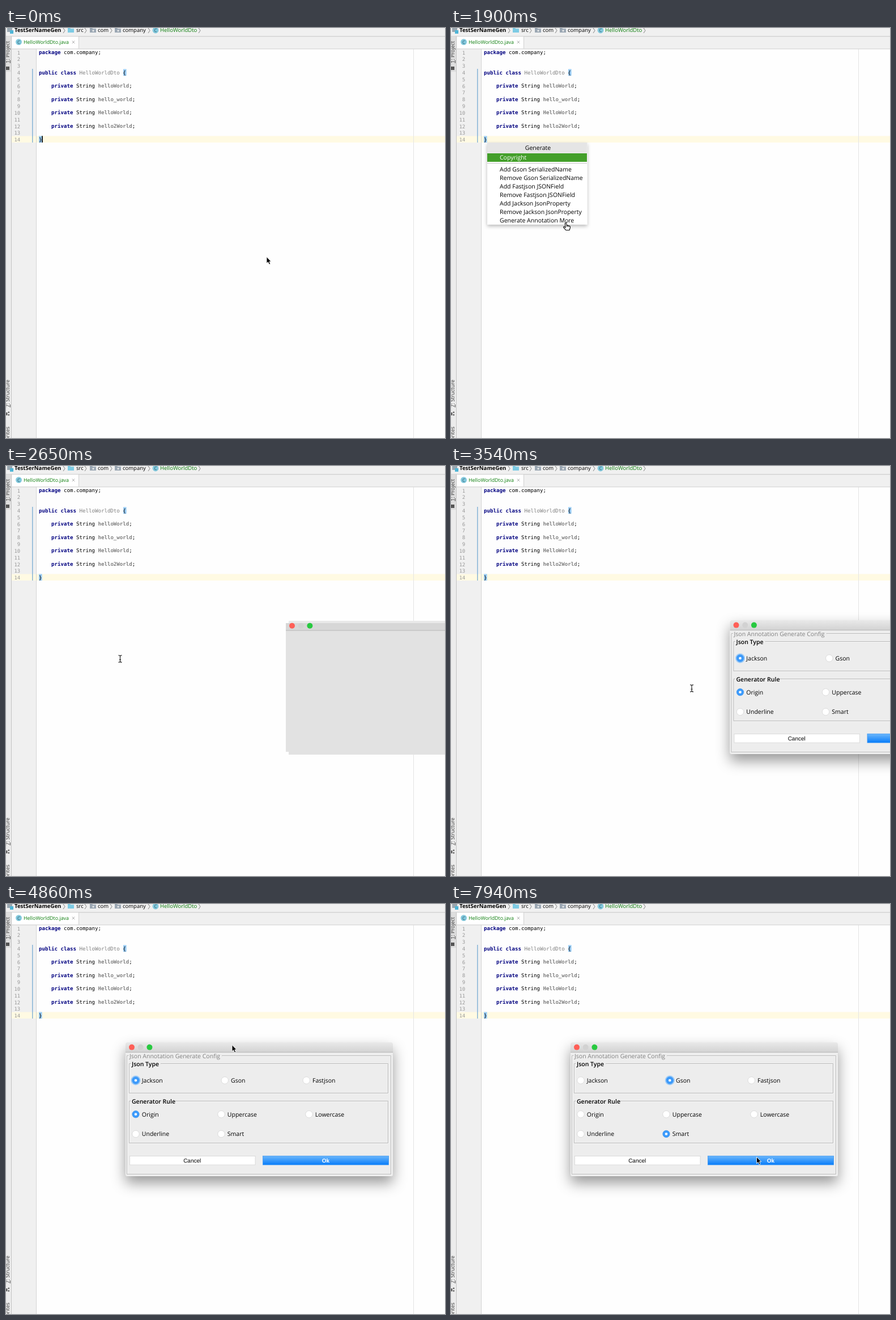
Animation of 775 by 723 pixels, one loop 8000 ms. Source, as an HTML page:

```html
<!DOCTYPE html>
<html lang="en">
<head>
<meta charset="utf-8">
<title>Generate menu demo</title>
<style>
html, body { margin: 0; width: 100%; height: 100%; overflow: hidden; background: #fff; }
svg { display: block; width: 100vw; height: 100vh; }
text { font: 500 10.5px "Open Sans", "Noto Sans", sans-serif; fill: #000; white-space: pre; text-rendering: geometricPrecision; }
.code { font: 9.14px "DejaVu Sans Mono", monospace; fill: #000; }
.kw { font-weight: bold; fill: #000080; }
.dim { fill: #808080; }
.field { font-weight: bold; fill: #808080; }
.num { font: 8.9px "DejaVu Sans Mono", monospace; fill: #999; text-anchor: end; }
.crumb { font-size: 9.5px; }
.project { font-weight: bold; font-size: 9.6px; }
.tab { font-size: 8.9px; }
.side { font-size: 9px; fill: #333; }
.green { fill: #0b7d0b; }
.head { font-weight: 600; }
.mid { text-anchor: middle; }
.btn { font: 10px "Liberation Sans", Arial, sans-serif; text-anchor: middle; }
</style>
</head>
<body>
<svg viewBox="0 0 775 723" preserveAspectRatio="none">
  <defs>
    <filter id="deep" x="-20%" y="-25%" width="140%" height="160%">
      <feDropShadow dx="0" dy="12" stdDeviation="12.5" flood-opacity=".4"/>
    </filter>
    <filter id="soft" x="-10%" y="-10%" width="120%" height="120%">
      <feDropShadow dx="0" dy="3" stdDeviation="3" flood-opacity=".28"/>
    </filter>
    <linearGradient id="bar" x2="0" y2="1"><stop stop-color="#e9e9e9"/><stop offset="1" stop-color="#d3d3d3"/></linearGradient>
    <linearGradient id="blue" x2="0" y2="1"><stop stop-color="#6cb7fb"/><stop offset="1" stop-color="#077cfa"/></linearGradient>
  </defs>
  <g id="editor"></g>
  <g id="menu"></g>
  <g id="ghost"></g>
  <g id="dialog"></g>
  <g id="arrow"><path d="M0 0V11.6L2.7 9.2 4.6 13.6 6.7 12.7 4.9 8.4H8.2Z" stroke="#fff" stroke-width=".9"/></g>
  <g id="hand"><path d="M-1.2 .8Q0-.8 1.2 .8L2 5 3.6 4.6 5.4 5.2 7 5.8Q8.4 6.4 8 8.4L6.6 13H.4L-3.6 8.4Q-4.4 6.6-2.6 6.9L-.4 8.4Z" fill="#fff" stroke="#000" stroke-width="1.1"/><path d="M2 5V7.4M3.9 5V7.4M5.7 5.6V7.6" stroke="#000" stroke-width=".7"/></g>
  <g id="beam"><path d="M-3-6.2Q0-6.2 0-4.5Q0-6.2 3-6.2M0-4.5V4.5M-3 6.2Q0 6.2 0 4.5Q0 6.2 3 6.2M-1.5 1.5H1.5" fill="none" stroke="#222" stroke-width="1.2"/></g>
</svg>
<script>
const $ = id => document.getElementById(id);
const rect = (x, y, w, h, fill, more = '') => `<rect x="${x}" y="${y}" width="${w}" height="${h}" fill="${fill}" ${more}/>`;
const circle = (x, y, r, fill, more = '') => `<circle cx="${x}" cy="${y}" r="${r}" fill="${fill}" ${more}/>`;
const text = (x, y, s, cls = '', more = '') => `<text x="${x}" y="${y}" class="${cls}" ${more}>${s}</text>`;
const span = (cls, s) => `<tspan class="${cls}">${s}</tspan>`;
const path = (d, color, more = '') => `<path d="${d}" fill="none" stroke="${color}" ${more}/>`;
const side = (y, s, anchor = 'start') => text(0, 0, s, 'side', `transform="translate(5.8 ${y}) rotate(-90)" text-anchor="${anchor}"`);

function classIcon(x, y) {
  return circle(x, y, 5.4, '#82c8dc') + text(x, y + 2.9, 'C', 'mid', 'style="font-size:8px;fill:#28566a"');
}

function folder(x, color, dot) {
  return `<path d="M${x} 0H${x + 4}L${x + 5.5} 1.2H${x + 11}V8H${x}Z" fill="${color}"/>` +
    (dot ? circle(x + 6, 4.8, 1.6, '#eee') : '');
}

function drawEditor() {
  const row = i => 43 + i * 11.81;
  const field = name => '    ' + span('kw', 'private') + ' String ' + span('field', name) + ';';
  const code = {
    0: span('kw', 'package') + ' com.company;',
    3: span('kw', 'public class') + ' ' + span('dim', 'HelloWorldDto') + ' {',
    5: field('helloWorld'), 7: field('hello_world'),
    9: field('HelloWorld'), 11: field('hello2World'), 13: '}'
  };
  let s = rect(0, 0, 775, 723, '#fefefe') + rect(0, 0, 775, 37, '#f0f0f0') +
    rect(10, 37, 43.5, 686, '#f0f0f0') + rect(10, 190.5, 765, 11.5, '#fffae3') +
    path('M53.5 37V723', '#d4d4d4') + path('M719.5 37V723', '#e4e4e4') +
    path('M46.8 72V202', '#76aad3', 'stroke-width="1.3"') +
    rect(207, 72.5, 5.6, 11.8, '#99ccf5') + rect(58, 190.5, 5.6, 11.5, '#99ccf5');
  for (let i = 0; i < 14; i++) {
    s += text(25.2, row(i) + 3.6, i + 1, 'num');
    if (code[i]) s += text(58, row(i) + 3.2, code[i], 'code');
  }
  // breadcrumbs
  s += path('M0 14.8H775', '#c6c6c6') + rect(2, 0, 9, 7, '#9aa7b0') + rect(7, 4, 6, 6, '#4fb5d6') +
    text(15, 7.4, 'TestSerNameGen', 'project') +
    folder(109, '#7dcbe4') + text(124, 7.4, 'src', 'crumb') +
    folder(148, '#9ba7b3', true) + text(162, 7.4, 'com', 'crumb') +
    folder(192, '#9ba7b3', true) + text(206, 7.4, 'company', 'crumb') +
    classIcon(264, 4) + text(272, 7.4, 'HelloWorldDto', 'crumb green');
  for (const x of [101, 139, 184, 251, 340]) s += path(`M${x} 0L${x + 3} 4.5 ${x} 9`, '#777', 'stroke-width=".9"');
  // file tab
  s += rect(10, 15.3, 118, 21.2, '#fff') + path('M128.5 15V36.5M10 36.9H775', '#cfcfcf') +
    classIcon(22.5, 24.6) + text(31, 27.8, 'HelloWorldDto.java', 'tab green') +
    path('M116.7 22.6L121.3 27.2M121.3 22.6L116.7 27.2', '#aaa');
  // tool strip
  s += rect(0, 15.3, 9.5, 708, '#ececec') + rect(0, 15.3, 9.5, 62, '#dedede') + path('M9.5 15V723', '#c4c4c4') +
    side(62, '<tspan text-decoration="underline">1</tspan>: Project') + rect(0, 68, 6, 6, '#555') +
    side(669, '<tspan text-decoration="underline">7</tspan>: Structure') +
    rect(0, 678, 2.5, 5, '#666') + rect(3.5, 676.5, 2.5, 2.5, '#666') + rect(3.5, 681, 2.5, 2.5, '#666') +
    side(703, '2: Favorites', 'end');
  $('editor').innerHTML = s + rect(63.2, 190.3, 1.7, 11.6, '#000', 'id="caret"');
}

function drawMenu(last) {
  const items = ['Add Gson SerializedName', 'Remove Gson SerializedName', 'Add Fastjson JSONField',
    'Remove Fastjson JSONField', 'Add Jackson JsonProperty', 'Remove Jackson JsonProperty', 'Generate Annotation More'];
  const white = 'style="fill:#fff"';
  $('menu').innerHTML = rect(64, 202, 176.5, 144.5, '#fff', 'filter="url(#soft)"') +
    rect(64, 202, 176.5, 18.7, '#e5e5e5') + text(153.5, 215, 'Generate', 'mid') +
    rect(64, last ? 331.3 : 221, 176, 15, '#439f2a') +
    text(86, 232.2, 'Copyright', '', last ? '' : white) + path('M64 238.5H240', '#c4c4c4') +
    items.map((s, i) => text(86, 252.8 + i * 15, s, '', last && i === 6 ? white : '')).join('');
}

const lights = (x, y) => ['#ff5f57', '#d2d2d2', '#28c940'].map((c, i) => circle(x + i * 15.7, y, 5, c)).join('');

function drawGhost(full) {
  $('ghost').innerHTML = rect(499, 273, 276, 236, '#e2e2e2') + rect(499, 273, 276, 17, '#e9e9e9') +
    (full ? rect(494, 277, 281, 227, '#e2e2e2') + rect(494, 277, 281, 13, '#d7d7d7') : '') +
    path(`M${full ? 494 : 499} 290H775`, '#b8b8b8') + lights(505, 281.8);
}

// etched frame with a gap for its title
function panel(x, y, w, h, label, end, cls) {
  const d = `M${x + 3} ${y}H${x}V${y + h}H${x + w}V${y}H${end}`;
  return path(d, '#f7f7f7', 'transform="translate(1 1)"') + path(d, '#b9b9b9') + text(x + 4.5, y + 4.6, label, cls);
}

const radios = [['Jackson', 229, 311], ['Gson', 386.3, 311], ['Fastjson', 530.3, 311],
  ['Origin', 229, 370.8], ['Uppercase', 380, 370.8], ['Lowercase', 535, 370.8],
  ['Underline', 229, 405.5], ['Smart', 380, 405.5]];

function drawDialog(type, rule, focus) {
  let s = rect(211, 244, 472, 236, '#ededed', 'rx="4" filter="url(#deep)"') +
    '<path d="M211 261V248Q211 244 215 244H679Q683 244 683 248V261Z" fill="url(#bar)"/>' +
    path('M211 261.5H683', '#b9b9b9') + lights(222, 252.6) +
    panel(213.5, 267.5, 466, 209, 'Json Annotation Generate Config', 381, 'dim') +
    panel(217.5, 281.5, 457, 52, 'Json Type', 273, 'head') +
    panel(217.5, 347.5, 457, 74, 'Generator Rule', 298, 'head');
  for (const [name, x, y] of radios) {
    const on = name === type || name === rule;
    if (name === focus) s += circle(x, y, 8.5, '#9ccbf8');
    s += circle(x, y, 6.2, on ? '#3d9bfb' : '#fff', `stroke="${on ? '#2f8bec' : '#cacaca'}" stroke-width=".6"`);
    if (on) s += circle(x, y, 2.3, '#fff');
    s += text(x + 10.8, y + 3.8, name);
  }
  $('dialog').innerHTML = s + rect(218.5, 444.5, 221.5, 15.5, '#fff', 'stroke="#d4d4d4" stroke-width=".8"') +
    text(328.7, 455.6, 'Cancel', 'btn') + rect(453.5, 444.3, 222, 15.7, 'url(#blue)', 'stroke="#3f98f3" stroke-width=".8"') +
    text(564.5, 455.6, 'Ok', 'btn', 'style="fill:#fff;font-weight:bold"');
}

// start time, cursor x, cursor y, cursor shape
const moves = [
  [0, 460, 403.5, 'arrow'], [1470, 405, 398], [1600, 310, 378], [1750, 226, 356], [1900, 202.5, 343.5, 'hand'],
  [2050, 201, 340, 'hand'], [2350, 201.5, 340, 'beam'],
  [3100, 214, 346, 'beam'], [3250, 262, 368, 'beam'], [3400, 335, 386, 'beam'], [3540, 425, 392, 'beam'],
  [3690, 520, 378], [3840, 600, 348], [3990, 660, 316], [4130, 687, 299],
  [4270, 680, 284], [4410, 670, 276], [4560, 667, 274], [4710, 495, 254], [4860, 399, 248.5],
  [5010, 425, 262], [5160, 500, 292], [5310, 547, 314],
  [5430, 546, 334], [5580, 530, 358], [5730, 480, 384], [5880, 415, 402], [6010, 382, 408],
  [6160, 382, 408], [6310, 386, 372], [6460, 388.5, 327], [6610, 389, 317], [6760, 389, 311],
  [7200, 418, 340], [7350, 474, 392], [7500, 522, 432], [7650, 537.5, 443], [7940, 539.5, 446]
];
const drags = [[0, 281.5, 28], [4710, 103, 6], [4860, 0, 0]];
const choices = [[0, 'Jackson', 'Origin', 'Jackson'], [6160, 'Jackson', 'Smart', 'Smart'], [7060, 'Gson', 'Smart', 'Gson']];

const at = (steps, t) => steps.findLast(s => s[0] <= t);
const show = (id, on) => { $(id).style.display = on ? '' : 'none'; };
const place = (id, x, y) => $(id).setAttribute('transform', `translate(${x} ${y})`);
const cache = {};
function once(draw, ...args) {
  const key = args.join();
  if (cache[draw.name] !== key) { cache[draw.name] = key; draw(...args); }
}

function render(t) {
  const [, x, y, shape = 'arrow'] = at(moves, t);
  const [, dx, dy] = at(drags, t);
  show('caret', t < 150 || (t >= 750 && t < 900));
  show('menu', t >= 900 && t < 2350);
  show('ghost', t >= 2500 && t < 2800);
  show('dialog', t >= 2800);
  once(drawMenu, t >= 2050);
  once(drawGhost, t >= 2650);
  once(drawDialog, ...at(choices, t).slice(1));
  place('dialog', dx, dy);
  for (const id of ['arrow', 'hand', 'beam']) show(id, id === shape);
  place(shape, x, y);
}

drawEditor();
const start = performance.now();
function tick() {
  render((performance.now() - start) % 8000);
  requestAnimationFrame(tick);
}
tick();
</script>
</body>
</html>
```
